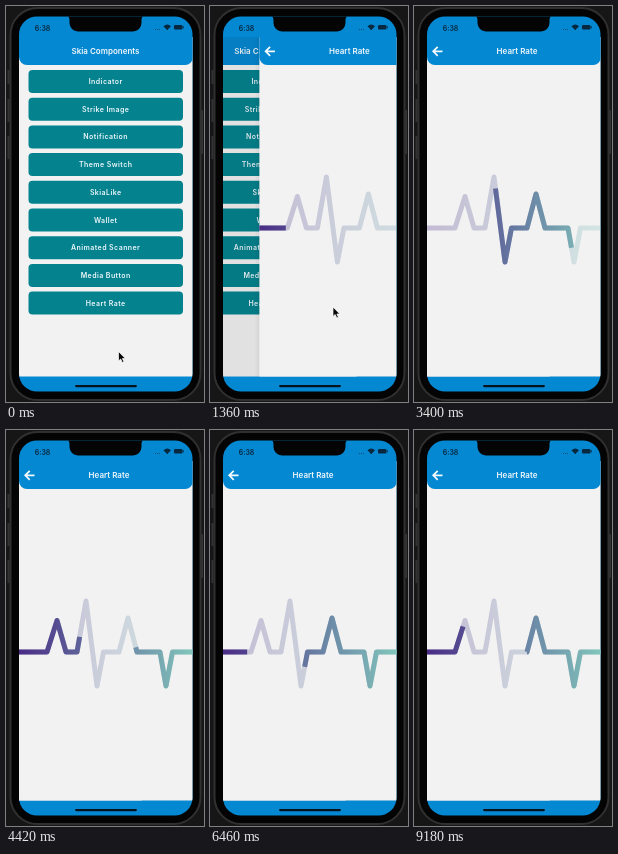
Recreate the animation shown at these times as an HTML page. Size 198 by 396 pixels, loop 9350 ms.

```html
<!DOCTYPE html>
<html lang="en">
<head>
<meta charset="utf-8">
<style>
  html, body { margin: 0; width: 100%; height: 100%; overflow: hidden; background: #161616; }
  svg { display: block; width: 198px; height: 396px; }
  text { font-family: Inter, "Open Sans", sans-serif; font-weight: 600; fill: #f0f7fb; text-anchor: middle; }
  .title { font-size: 8px; }
  .label { font-size: 7px; letter-spacing: .43px; }
  .heart { fill: none; stroke: url(#ink); stroke-width: 5; stroke-linejoin: round; }
</style>
</head>
<body>
<svg viewBox="0 0 198 396">
  <defs>
    <linearGradient id="ink" gradientUnits="userSpaceOnUse" x1="13" y1="0" x2="187" y2="0">
      <stop stop-color="#4a2c86"/><stop offset="1" stop-color="#82c6bc"/>
    </linearGradient>
    <linearGradient id="shade">
      <stop stop-opacity="0"/><stop offset="1" stop-opacity=".06"/>
    </linearGradient>
    <clipPath id="screen"><rect x="13" y="10.5" width="173.5" height="375" rx="18"/></clipPath>
    <clipPath id="safe"><rect y="31" width="198" height="339.500"/></clipPath>
    <path id="beat" pathLength="100" d="M13 222H41L51 190.500L60 222H71L80 171L91 256L97.500 222H113L122 188L131 222H154L160 256L166.500 222H187"/>
    <g id="panel">
      <rect x="13" y="31" width="175" height="340" fill="#f2f2f2"/>
      <path d="M13 31H187V51a8 8 0 0 1-8 8H21a8 8 0 0 1-8-8z" fill="#0588d2"/>
    </g>
  </defs>

  <path d="M2.500 64v14M2.500 93v23M2.500 130v23M196 104v44" stroke="#333" stroke-width="2"/>
  <rect x="4.500" y="2" width="190" height="392" rx="27" fill="#040404" stroke="#303030" stroke-width="2"/>

  <g clip-path="url(#screen)">
    <rect width="198" height="396" fill="#0588d2"/>
    <g clip-path="url(#safe)">
      <g id="home">
        <use href="#panel"/>
        <text class="title" x="99.500" y="48">Skia Components</text>
        <g id="list"></g>
      </g>
      <rect id="dim" x="13" y="31" width="175" height="340" opacity="0"/>
      <g id="detail">
        <rect x="8" y="31" width="5" height="340" fill="url(#shade)"/>
        <use href="#panel"/>
        <text class="title" x="103" y="48">Heart Rate</text>
        <path d="M28.500 45.300H19.500M23.700 40.800L19.200 45.300L23.700 49.800" fill="none" stroke="#f4fafd" stroke-width="1.700"/>
        <use href="#beat" class="heart" opacity=".28"/>
        <use href="#beat" class="heart" id="pulse"/>
      </g>
    </g>
    <path d="M60 10C63 10 63.500 12 63.500 15V17a8.500 8.500 0 0 0 8.500 8.500H127a8.500 8.500 0 0 0 8.500-8.500V15C135.500 12 136 10 139 10z" fill="#040404"/>
    <g fill="#07283f">
      <text x="36.500" y="24.600" style="font-size:7px;fill:#07283f">6:38</text>
      <path d="M149 23h1v1h-1zM151 23h1v1h-1zM153 23h1v1h-1z" opacity=".6"/>
      <path d="M157.500 20.200Q161.200 17 165 20.200L161.200 24.200z"/>
      <rect x="168" y="19" width="8.500" height="4.500" rx="1.200"/>
      <rect x="177" y="20.300" width=".8" height="2"/>
    </g>
    <rect x="69" y="379" width="62" height="2.200" rx="1.100" fill="#06121c"/>
  </g>
  <path id="cursor" d="M0 0V9.500L2.200 7.500L3.800 11L5.400 10.300L3.900 7H6.800z" fill="#080808" stroke="#fff" stroke-width=".7"/>
</svg>
<script>
const LOOP = 9350, STEP = 170, WIDTH = 174;
const PUSH_START = 1136, PULSE_START = 1218, PULSE_PERIOD = 2556;
const $ = id => document.getElementById(id);
const clamp = v => Math.min(1, Math.max(0, v));
const smooth = v => v * v * (3 - 2 * v);
const shift = (id, x, y = 0) => $(id).setAttribute('transform', `translate(${x} ${y})`);

const items = ['Indicator', 'Strike Image', 'Notification', 'Theme Switch', 'SkiaLike',
  'Wallet', 'Animated Scanner', 'Media Button', 'Heart Rate'];
$('list').innerHTML = items.map((name, i) => {
  const y = 64 + i * 27.7;
  return `<rect x="22.500" y="${y}" width="154.500" height="23" rx="4" fill="#04838f"/>
    <text class="label" x="99.700" y="${y + 14}">${name}</text>`;
}).join('');

// Critically damped spring, 0 to 1
function spring(ms) {
  const x = Math.max(0, ms) * .0131;
  return 1 - (1 + x) * Math.exp(-x);
}

function drawPulse(t) {
  const head = Math.max(0, (t - PULSE_START) / PULSE_PERIOD * 100);
  const pulse = $('pulse');
  pulse.style.visibility = head > 0 ? 'visible' : 'hidden';
  pulse.setAttribute('stroke-dasharray', head < 50 ? `${head} 200` : '50 50');
  pulse.setAttribute('stroke-dashoffset', head < 50 ? 0 : 50 - head % 100);
}

function drawCursor(t) {
  const go = smooth(clamp((t - 170) / 850)), leave = smooth(clamp((t - 1400) / 350));
  shift('cursor', 112.5 + 10.5 * go + 5 * leave, 345.5 - 44.5 * go + 75 * leave);
  $('cursor').style.visibility = t < 1700 ? 'visible' : 'hidden';
}

function draw(now) {
  const t = Math.floor(now % LOOP / STEP) * STEP;
  const p = spring(t - PUSH_START);
  shift('home', -.3 * WIDTH * p);
  shift('detail', WIDTH * (1 - p));
  $('detail').style.visibility = p > 0 ? 'inherit' : 'hidden';
  $('dim').setAttribute('opacity', .09 * p);
  drawPulse(t);
  drawCursor(t);
}

const start = performance.now();
(function tick() {
  draw(performance.now() - start);
  requestAnimationFrame(tick);
})();
</script>
</body>
</html>
```
